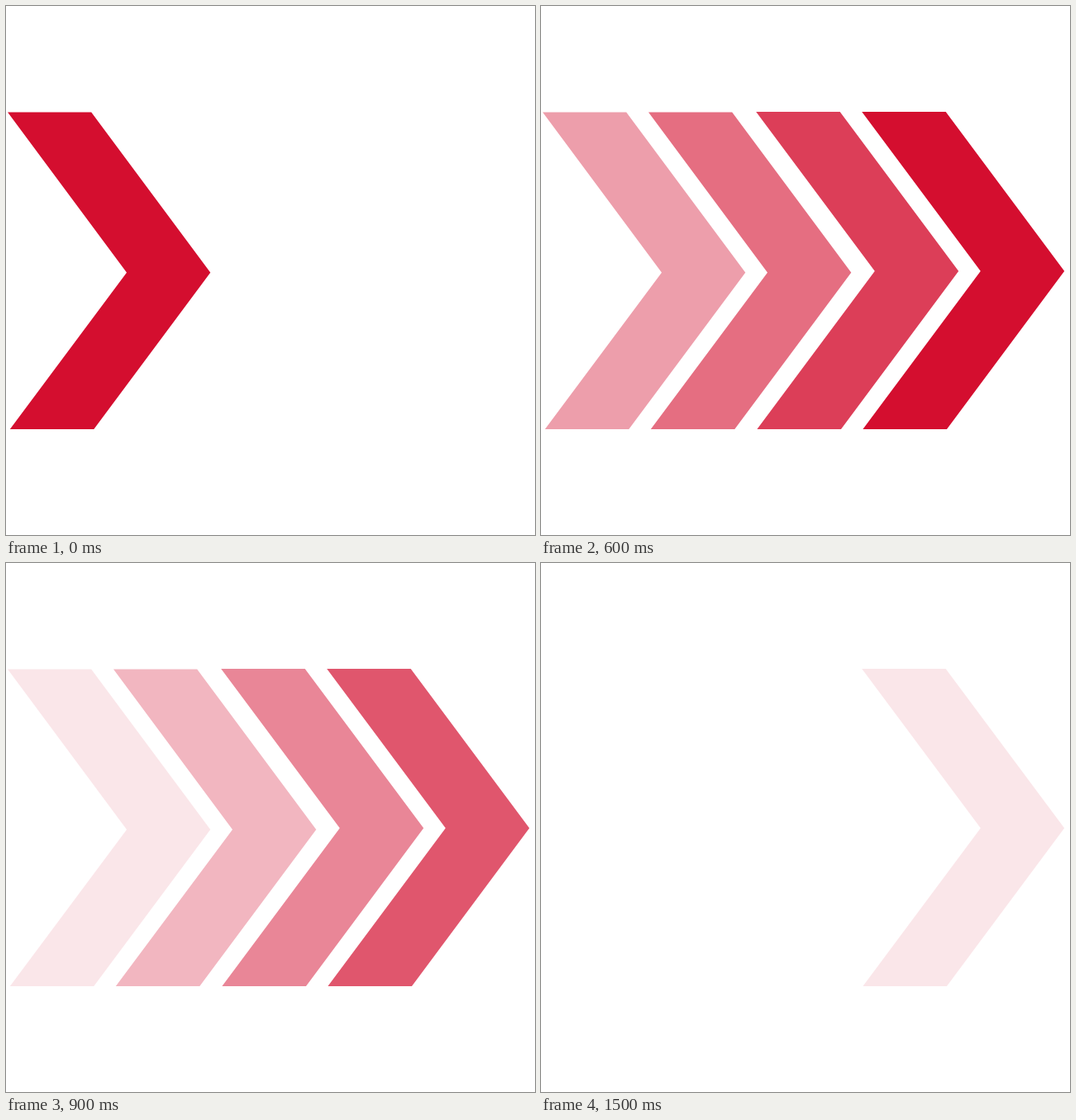
Write an HTML page without scripts that moves like this. It is 640 px wide and 640 px high and loops after 1600 ms.

```html
<!DOCTYPE html>
<html lang="en">
<head>
<meta charset="utf-8">
<title>Chevrons</title>
<style>
  html, body { margin: 0; width: 100%; height: 100%; overflow: hidden; background: #fff; }
  svg { display: block; width: 100%; height: 100%; }
  .chevron {
    fill: #d40e2f;
    opacity: 0;
    animation: fade 1600ms calc(var(--i) * 200ms) infinite;
  }
  /* Lights up at once, then dims by a tenth every 100 ms. */
  @keyframes fade {
    0% { opacity: 1; animation-timing-function: steps(10, end); }
    62.5%, 100% { opacity: 0; }
  }
</style>
</head>
<body>
<svg viewBox="0 0 640 640">
  <defs>
    <path id="left" d="M2 128.5H103.2L247.3 322.4L106.3 512H4.8L146 322.4Z"/>
    <path id="right" d="M260.2 128H361.7L505.2 320.8L363 512H261.4L403.8 320.8Z"/>
  </defs>
  <use class="chevron" href="#left" style="--i:0"/>
  <use class="chevron" href="#left" x="128" style="--i:1"/>
  <use class="chevron" href="#right" style="--i:2"/>
  <use class="chevron" href="#right" x="128" style="--i:3"/>
</svg>
</body>
</html>
```
